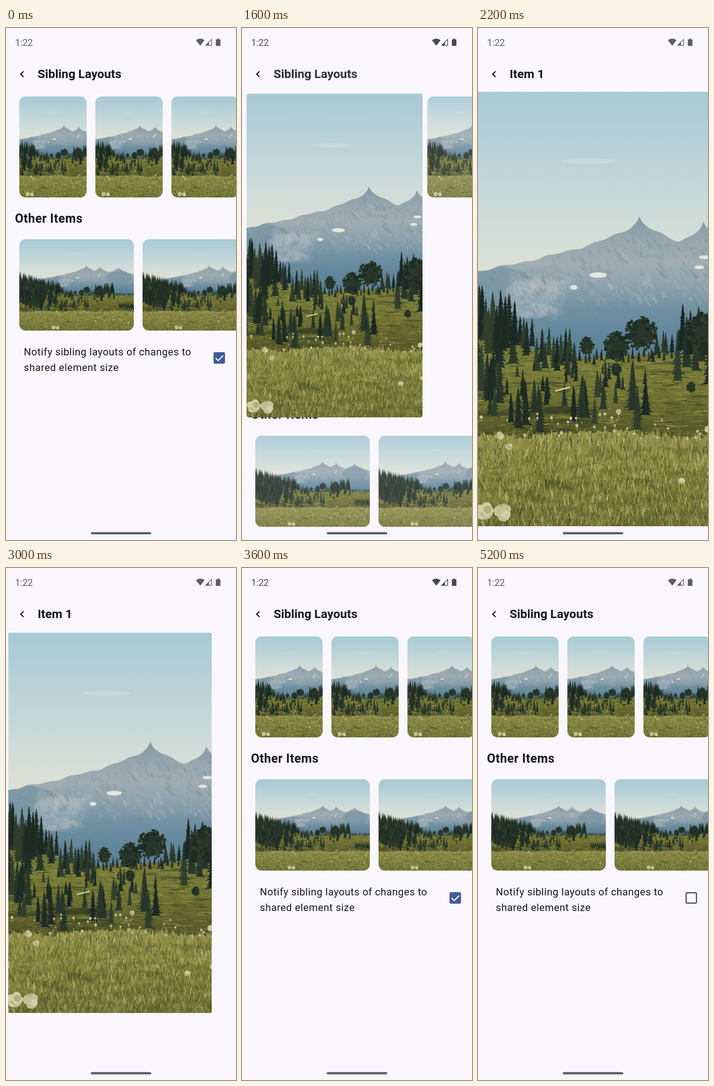
An HTML page with a canvas for the animation above (5.3 s loop, 502 by 1115 pixels).

```html
<!DOCTYPE html>
<html lang="en">
<head>
<meta charset="utf-8">
<title>Sibling Layouts</title>
<style>
  html, body { margin: 0; width: 100%; height: 100%; overflow: hidden; background: #f9f7fd; }
  #stage { position: absolute; left: 0; top: 0; width: 502px; height: 1115px; overflow: hidden; background: #f9f7fd; }
  #stage div, svg, canvas { position: absolute; left: 0; top: 0; }
  #list, #row, #lower, #veil { width: 502px; height: 1115px; }
  canvas { border-radius: 14px; }
  #hero { object-fit: cover; }
  #veil { background: #000; }
  #touch {
    box-sizing: border-box; width: 23px; height: 23px; margin: -11.5px; border-radius: 50%;
    background: rgba(218, 226, 226, .76); border: 1px solid rgba(120, 142, 146, .6);
  }
  text { font-family: Roboto, sans-serif; fill: #17171b; }
  .head { font-size: 26.5px; font-weight: 700; }
  .sub { font-size: 26.8px; font-weight: 700; letter-spacing: .55px; }
  .body { font-size: 22px; letter-spacing: .6px; }
  #status text { font-size: 20px; fill: inherit; }
</style>
</head>
<body>
<div id="stage">
  <div id="veil"></div>
  <div id="list">
    <svg width="502" height="1115"><text class="head" x="69" y="109.3">Sibling Layouts</text></svg>
    <div id="row"></div>
    <div id="lower">
      <svg width="502" height="1115">
        <text class="sub" x="19.5" y="423.5">Other Items</text>
        <text class="body" x="39" y="713.3">Notify sibling layouts of changes to</text>
        <text class="body" x="39" y="746.8">shared element size</text>
        <circle id="ripple" cx="465.5" cy="718.5" r="24.4" fill="#1b1b1f"/>
        <rect id="empty" x="454.2" y="707.2" width="22.6" height="22.6" rx="2" fill="none" stroke="#46464e" stroke-width="2.4"/>
        <g id="checked">
          <rect x="453" y="706" width="25" height="25" rx="3" fill="#405c94"/>
          <path d="M457.5 718.7l5.6 5.6 11-11" fill="none" stroke="#fff" stroke-width="2.5"/>
        </g>
      </svg>
    </div>
  </div>
  <svg id="detail" width="502" height="1115"><text class="head" x="69" y="109.3">Item 1</text></svg>
  <canvas id="hero"></canvas>
  <svg width="502" height="1115">
    <path d="M38.3 94.3L32 100.5l6.3 6.2" fill="none" stroke="#17171b" stroke-width="2.5"/>
    <g id="status">
      <text x="20" y="38.6">1:22</text>
      <path d="M424 38.5L414.5 26.6Q424 19.4 433.5 26.6Z"/>
      <path fill-rule="evenodd" d="M449.5 23v15.5H434ZM448 26.5L443 31.6V37h5Z"/>
      <path d="M461 23h4v2h3v14h-10v-14h3Z"/>
    </g>
    <rect x="185" y="1097.7" width="132" height="5" rx="2.5" fill="#5f6165"/>
  </svg>
  <div id="touch"></div>
</div>
<script>
const start = performance.now();
const el = id => document.getElementById(id);
const clamp = v => Math.max(0, Math.min(1, v));
const mix = (a, b, k) => a + (b - a) * k;

// ---- landscape -------------------------------------------------------
let seed = 7;
const rnd = (a = 0, b = 1) => {
  seed = (seed * 1664525 + 1013904223) % 4294967296;
  return a + (b - a) * seed / 4294967296;
};
const pick = list => list[Math.floor(rnd(0, list.length))];
const LEFT = -338, RIGHT = 840, TOP = 139, BOTTOM = 1085;
const PINE = ['#1f2d25', '#27362a', '#303e2b', '#1b2924'];

const photo = document.createElement('canvas');
photo.width = RIGHT - LEFT;
photo.height = BOTTOM - TOP;
const g = photo.getContext('2d');

function ramp(y0, y1, ...colors) {
  const grad = g.createLinearGradient(0, y0, 0, y1);
  colors.forEach((c, i) => grad.addColorStop(i / (colors.length - 1), c));
  return grad;
}
function trace(pts) {
  g.beginPath();
  for (const [x, y] of pts) g.lineTo(x, y);
  g.closePath();
}
// everything below the curve top(x)
function traceGround(top) {
  const pts = [];
  for (let x = LEFT; x <= RIGHT + 5; x += 5) pts.push([x, top(x)]);
  trace([...pts, [RIGHT + 5, BOTTOM], [LEFT, BOTTOM]]);
}
function oval(fill, x, y, rx, ry) {
  g.fillStyle = fill;
  g.beginPath();
  g.ellipse(x, y, rx, ry, 0, 0, 7);
  g.fill();
}
function line(color, width, x0, y0, x1, y1) {
  g.strokeStyle = color;
  g.lineWidth = width;
  g.beginPath();
  g.moveTo(x0, y0);
  g.lineTo(x1, y1);
  g.stroke();
}
function strokes(n, colors, y0, y1, dx, dy, width) {
  for (let i = 0; i < n; i++) {
    const x = rnd(LEFT, RIGHT), y = mix(y0, y1, i / n), k = rnd(.3, 1);
    g.globalAlpha = rnd(.25, .75);
    line(pick(colors), width * k, x, y, x + dx * rnd(-1, 1), y + dy * k);
  }
  g.globalAlpha = 1;
}

function fir(x, top, base, w = (base - top) * .26 + 3) {
  const n = Math.max(4, Math.round((base - top) / 7)), left = [], right = [];
  for (let i = 1; i <= n; i++) {
    const y = mix(top, base, i / n), half = w / 2 * (i / n) ** .8;
    left.push([x - half * rnd(.6, 1.25), y], [x - half * .45, y - 2]);
    right.unshift([x + half * .45, y - 2], [x + half * rnd(.6, 1.25), y]);
  }
  trace([[x, top], ...left, ...right]);
  g.fillStyle = pick(PINE);
  g.fill();
}
function forest(x0, x1, top0, top1, h, gap = 7) {
  for (let x = x0; x < x1; x += rnd(.4, 1.6) * gap) {
    const top = mix(top0, top1, (x - x0) / (x1 - x0)) + rnd() ** 2 * h * .6;
    fir(x, top, top + h * rnd(.85, 1.1));
  }
}
function leafy(x, y, r) {
  oval(PINE[1], x, y, r * .7, r * .85);
  for (let i = 0; i < 110; i++) {
    const a = rnd(0, 6.3), d = r * Math.sqrt(rnd(.2, 1.1));
    oval(pick(PINE), x + Math.cos(a) * d * .85, y + Math.sin(a) * d, r * rnd(.07, .18), r * rnd(.05, .12));
  }
}

const PEAKS = [[352, 411], [492, 424], [681, 427]];
const ridge = x => Math.min(...PEAKS.map(([px, py]) => py + 4.2 * Math.abs(x - px) ** .57))
  + 3 * Math.sin(x / 11) * Math.sin(x / 29);

function mountains() {
  g.save();
  traceGround(ridge);
  g.clip();
  g.fillStyle = ramp(411, 720, '#8799a4', '#98a7af', '#a0adb3', '#8ba0ab', '#6f90a2', '#61869b', '#5a7f93');
  g.fillRect(LEFT, 400, RIGHT - LEFT, 400);
  g.globalAlpha = .6;
  oval('#7292a1', 30, 560, 85, 42);
  oval('#7292a1', 690, 535, 130, 65);
  g.globalAlpha = .09;
  for (let i = 0; i < 60; i++) oval('#ced0cb', rnd(70, 185), rnd(545, 625), rnd(8, 32), rnd(6, 18));
  for (let i = 0; i < 900; i++) {
    const x = rnd(-40, RIGHT), depth = rnd(2, 170), y = ridge(x) + depth, s = rnd(4, 20);
    const lit = rnd(30, 130) < depth && y < 590;
    g.globalAlpha = rnd(.08, .35);
    line(pick(lit ? ['#b9bfbf', '#adb6ba'] : ['#708896', '#7b919e']), rnd(1.5, 7), x, y, x + s * rnd(.2, 1.2), y + s);
  }
  g.globalAlpha = 1;
  const snow = '#e4e5df';
  oval(snow, 262, 538, 19, 6);
  oval(snow, 209, 565, 8, 5);
  oval(snow, 494, 499, 12, 4);
  oval(snow, 483, 521, 11, 4);
  g.restore();
}

const hill = x => x < 260 ? 722 - 62 * clamp((260 - x) / 260) ** 1.6 : 716 - 8 * Math.sin((x - 260) / 150);

function meadow() {
  traceGround(hill);
  g.fillStyle = ramp(660, 890, '#696f32', '#7c7f3a', '#6e7031', '#505428');
  g.fill();
  strokes(2600, ['#98974a', '#888a3f', '#4b5228', '#3a4424', '#62672d'], 712, 890, 32, 2, 3);
  g.globalAlpha = .5;
  for (let i = 0; i < 34; i++) oval('#323d26', rnd(LEFT, 260), rnd(770, 885), rnd(15, 60), rnd(3, 9));
  for (let i = 0; i < 14; i++) oval('#3f4828', rnd(320, RIGHT), rnd(725, 850), rnd(15, 55), rnd(2, 4));
  g.globalAlpha = 1;
}

function trees() {
  for (let y = 600; y < 840; y += 20) forest(LEFT, mix(-40, -100, (y - 600) / 240), y - 130, y - 50, 90, 14);
  forest(-60, 86, 545, 575, 110, 6);
  forest(92, 212, 622, 655, 72, 8);
  forest(200, 432, 698, 690, 26, 9);
  forest(390, 440, 650, 640, 50, 10);
  forest(436, 640, 600, 580, 110, 8);
  forest(640, RIGHT, 684, 690, 28, 9);
  leafy(356, 664, 36);
  leafy(303, 693, 30);
  leafy(238, 692, 18);
  leafy(490, 660, 38);
  leafy(301, 744, 13);
  leafy(465, 782, 11);
  forest(-40, 55, 675, 700, 100, 9);
  forest(690, RIGHT, 780, 790, 55, 6);
  // nearer trees stand lower and taller
  for (let i = 0; i < 44; i++) {
    const base = mix(745, 886, i / 44), x = 140 + (rnd() + rnd() - 1) * 270;
    fir(x, base - (base - 690) * rnd(.3, .55), base);
  }
  fir(338, 722, 835, 36);
  fir(366, 768, 845, 32);
  fir(228, 754, 850, 36);
  line('#d6d2b4', 3, 168, 791, 201, 782);
}

function foreground() {
  traceGround(x => 884 + 6 * Math.sin(x / 60) + rnd(-6, 6));
  g.fillStyle = ramp(880, BOTTOM, '#93914d', '#87863f', '#777837', '#6c7035');
  g.fill();
  g.globalAlpha = .22;
  for (let i = 0; i < 500; i++) {
    oval(pick(['#414a22', '#565c28', '#b3ae62']), rnd(LEFT, RIGHT), rnd(915, BOTTOM), rnd(6, 28), rnd(3, 10));
  }
  strokes(9000, ['#c0bb75', '#aaa656', '#8d8d42', '#666b30', '#474f25', '#3e4722', '#d0cb8c'], 890, BOTTOM + 12, 6, -18, 2.2);
}

function flower(x, y, r) {
  line('#a09f66', 1.2, x, y, x + 1, y + r * 3);
  for (let i = 0; i < 24; i++) {
    const a = rnd(0, 6.3), d = r * .6 * Math.sqrt(rnd());
    oval(pick(['#c4bf92', '#d3cea6', '#b3ae7e']), x + Math.cos(a) * d, y + Math.sin(a) * d, r * .45, r * .45);
  }
}

function landscape() {
  g.translate(-LEFT, -TOP);
  g.fillStyle = ramp(TOP, 540, '#a9c9d4', '#b5d0d8', '#c3d7d9', '#d2ddd8', '#dee1d6');
  g.fillRect(LEFT, TOP, RIGHT - LEFT, 620);
  g.globalAlpha = .25;
  oval('#eeeadd', 242, 290, 60, 6);
  g.globalAlpha = 1;
  mountains();
  meadow();
  trees();
  foreground();
  for (let i = 0; i < 80; i++) flower(rnd(LEFT, RIGHT), rnd(835, 895), rnd(1, 4));
  for (let i = 0; i < 10; i++) flower(rnd(420, RIGHT), rnd(860, 1010), rnd(4, 8));
  flower(48, 888, 9);
  flower(67, 911, 8);
  flower(307, 836, 6);
  flower(14, 1052, 20);
  flower(54, 1055, 20);
}

// ---- layout ----------------------------------------------------------
const SMALL = { x: 29.3, y: 149.3, w: 146.5, h: 219.6 };
const FULL = { x: 0, y: 139.3, w: 502, h: 946 };

function place(node, box) {
  for (const [prop, key] of [['left', 'x'], ['top', 'y'], ['width', 'w'], ['height', 'h']])
    node.style[prop] = box[key] + 'px';
}
function card(parent, x, y, w, h) {
  const c = document.createElement('canvas');
  c.width = Math.round(w);
  c.height = Math.round(h);
  const ctx = c.getContext('2d'), sw = photo.height * w / h;
  ctx.imageSmoothingQuality = 'high';
  ctx.drawImage(photo, (photo.width - sw) / 2, 0, sw, photo.height, 0, 0, c.width, c.height);
  place(c, { x, y, w, h });
  parent.append(c);
  return c;
}

landscape();
const hero = el('hero');
hero.width = photo.width;
hero.height = photo.height;
hero.getContext('2d').drawImage(photo, 0, 0);
const first = card(el('list'), SMALL.x, SMALL.y, SMALL.w, SMALL.h);
for (const i of [1, 2]) card(el('row'), SMALL.x + 165.9 * i, SMALL.y, SMALL.w, SMALL.h);
for (const i of [0, 1]) card(el('lower'), SMALL.x + 268.7 * i, 459.7, 249.3, 199.8);

// ---- motion ----------------------------------------------------------
const LOOP = 5300, TICK = 100;
const TAPS = [
  { at: 1400, x: 110, y: 322 },
  { at: 2800, x: 34, y: 100 },
  { at: 4400, x: 457, y: 723 },
];

// critically damped spring
const spring = ms => ms <= 0 ? 0 : 1 - (1 + ms / 50) * Math.exp(-ms / 50);

// cubic-bezier(.4, 0, .2, 1) over 700 ms
function fade(ms) {
  const x = clamp(ms / 700);
  if (x === 0 || x === 1) return x;
  let lo = 0, hi = 1, s;
  for (let i = 0; i < 24; i++) {
    s = (lo + hi) / 2;
    if (1.2 * s * (1 - s) ** 2 + .6 * s * s * (1 - s) + s ** 3 < x) lo = s; else hi = s;
  }
  return s * s * (3 - 2 * s);
}

function render(t) {
  const back = t >= 2900;
  const p = back ? 1 - fade(t - 3000) : fade(t - 1465);
  const grow = back ? 1 - spring(t - 2964) : spring(t - 1485);
  const push = back ? 1 - spring(t - 2980) : spring(t - 1501);
  const moving = p > 0 && p < 1;

  hero.style.visibility = p > 0 ? 'visible' : 'hidden';
  first.style.visibility = p > 0 ? 'hidden' : 'visible';
  const box = {};
  for (const k in SMALL) box[k] = mix(SMALL[k], FULL[k], grow);
  place(hero, box);
  hero.style.borderRadius = 14 * (1 - grow) + 'px';

  el('list').style.opacity = 1 - p;
  el('detail').style.opacity = p;
  el('row').style.transform = `translateX(${(FULL.w - SMALL.w) * push}px)`;
  el('lower').style.transform = `translateY(${(FULL.h - SMALL.h) * push}px)`;
  el('veil').style.opacity = back ? .1 * p * (1 - p) : 0;
  el('status').style.fill = moving ? '#4b4b4f' : '#5f5f64';

  const on = t < 4600 ? 1 : t < 4700 ? .4 : 0;
  el('checked').style.opacity = on;
  el('empty').style.opacity = 1 - on;
  el('ripple').style.opacity = .1 * clamp((t - 4400) / 200) * clamp((5200 - t) / 400);

  const touch = el('touch'), tap = TAPS.find(({ at }) => t >= at && t < at + 2 * TICK);
  touch.style.opacity = tap ? (t < tap.at + TICK ? 1 : .5) : 0;
  if (tap) touch.style.transform = `translate(${tap.x}px, ${tap.y}px)`;
}

let last = -1;
function loop() {
  const t = Math.floor((performance.now() - start) % LOOP / TICK) * TICK;
  if (t !== last) render(last = t);
  requestAnimationFrame(loop);
}
loop();
</script>
</body>
</html>
```
